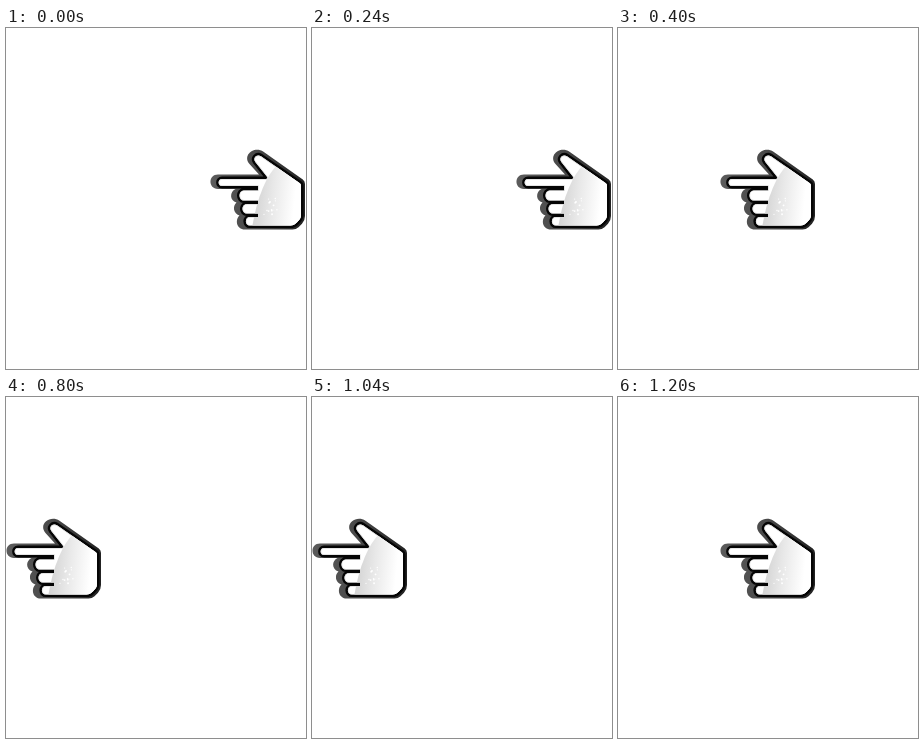
These frames come from a looping animation (300x341 px, 1.6 s). An HTML page:

```html
<!DOCTYPE html>
<html lang="en">
<head>
<meta charset="utf-8">
<title>Pointing hand</title>
<style>
  html, body { margin: 0; width: 100%; height: 100%; overflow: hidden; background: #fff; }
  svg { display: block; width: 100%; height: 100%; }
</style>
</head>
<body>
<svg viewBox="0 0 300 341">
  <defs>
    <path id="face" d="M114 151 H157.5 Q160.5 151 158.8 148.6 L147.3 134
      C144.5 130 148.5 125.8 153 128.2 L173.5 142.5 L191.8 155.2 Q193 156 193 157.5
      V187 C193 189.5 192 191.2 190 193.2 L188.3 195 Q185.8 197.6 182.5 197.6
      H142 C136.5 197.6 136.5 189 142 189 H150 V185.6
      H139 C133 185.6 133 176 139 176 H150 V172.6
      H136 C130 172.6 130 162.4 136 162.4 H150 V158
      H114 C109.5 158 109.5 151 114 151 Z"/>
    <clipPath id="inside"><use href="#face"/></clipPath>
    <linearGradient id="palm" gradientUnits="userSpaceOnUse" x1="145" y1="176" x2="186" y2="180">
      <stop offset="0" stop-color="#d2d2d2"/>
      <stop offset=".45" stop-color="#e8e8e8"/>
      <stop offset="1" stop-color="#fff"/>
    </linearGradient>
    <linearGradient id="bevel" gradientUnits="userSpaceOnUse" x1="102" y1="0" x2="197" y2="0">
      <stop offset="0" stop-color="#5c5c5c"/>
      <stop offset=".5" stop-color="#484848"/>
      <stop offset="1" stop-color="#222"/>
    </linearGradient>
  </defs>
  <g id="hand">
    <path fill="url(#bevel)" d="M151 146.6 H110 C100 146.6 100 161 110 161 H127.5
      C121.5 164 121.5 172.5 128.5 174.6 C124.5 178 125 185.5 131.5 187.6
      C127 191.5 128 201.6 137 201.6 H184.5 Q188 201.6 190.5 199.2
      L194 195.8 Q197 192.5 197 188 V156 Q197 153 194.8 151.5
      L176 138.2 L155.5 123.8 C146 117.5 134 127.5 141.5 136 Z"/>
    <use href="#face" stroke="#050505" stroke-width="5" stroke-linejoin="round"/>
    <use href="#face" fill="#fff"/>
    <g clip-path="url(#inside)">
      <use href="#face" fill="none" stroke="#ddd" stroke-width="1.4"/>
      <path d="M170 136 Q151 155 143.5 203 H200 V136 Z" fill="url(#palm)"/>
      <g id="sparkles" fill="#fff"/>
    </g>
  </g>
</svg>
<script>
  const hand = document.getElementById('hand');
  const sparkles = document.getElementById('sparkles');

  let seed = 7;
  const random = () => (seed = seed * 16807 % 2147483647) / 2147483647;
  for (let i = 0; i < 14; i++) {
    const dot = document.createElementNS('http://www.w3.org/2000/svg', 'circle');
    dot.setAttribute('cx', 156 + random() * 14);
    dot.setAttribute('cy', 168 + random() * 20);
    dot.setAttribute('r', 0.4 + random() * 0.6);
    sparkles.append(dot);
  }

  const STEP = 400;
  const shifts = [102, 0, -102, 0];
  const start = performance.now();

  function draw(now) {
    const step = Math.floor(Math.max(0, now - start) / STEP) % shifts.length;
    hand.setAttribute('transform', `translate(${shifts[step]} 0)`);
    requestAnimationFrame(draw);
  }
  draw(start);
</script>
</body>
</html>
```
